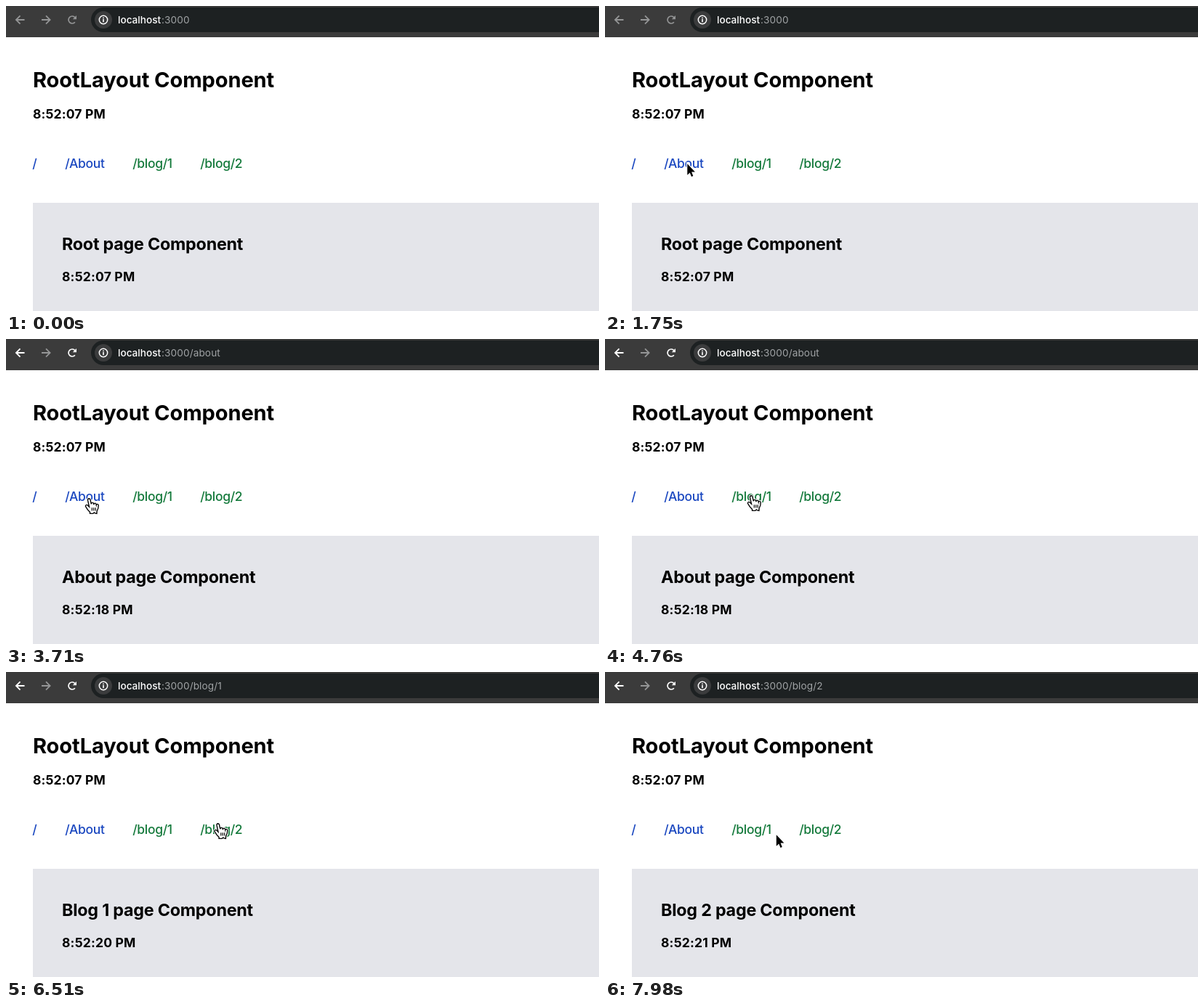
Animation of 816x420 px, one loop 8000 ms. Source, as an HTML page with a canvas:

```html
<!DOCTYPE html>
<html lang="en">
<head>
<meta charset="utf-8">
<title>Layout and page components</title>
<style>
html, body { margin: 0; width: 100%; height: 100%; overflow: hidden; background: #fff; }
canvas { display: block; }
</style>
</head>
<body>
<canvas id="stage" width="816" height="420"></canvas>
<script>
const ctx = document.getElementById('stage').getContext('2d');
const LOOP = 8000, STEP = 70;
const FOCUS_AT = 1960;

const pages = [
  { at: 0, path: '', title: 'Root page Component', time: '8:52:07 PM' },
  { at: 3570, path: '/about', title: 'About page Component', time: '8:52:18 PM' },
  { at: 5530, path: '/blog/1', title: 'Blog 1 page Component', time: '8:52:20 PM' },
  { at: 7280, path: '/blog/2', title: 'Blog 2 page Component', time: '8:52:21 PM' }
];

const BLUE = '#1b48c0', GREEN = '#157a3c';
const links = [
  { label: '/', x: 36.3, end: 42, color: BLUE },
  { label: '/About', x: 81.2, end: 135, color: BLUE },
  { label: '/blog/1', x: 174.2, end: 228, color: GREEN },
  { label: '/blog/2', x: 267.2, end: 324, color: GREEN }
];

// Pointer hotspot: time, x, y
const track = [
  [560, 178, 354], [770, 143, 272], [980, 123.5, 231], [1260, 115, 212],
  [1330, 115, 212], [1470, 112.5, 217], [1750, 112.5, 217], [2100, 112, 218],
  [4270, 112, 218], [4410, 132, 222], [4620, 183, 219], [4760, 199, 214],
  [5250, 198, 214], [6230, 198, 214], [6370, 248, 211], [6510, 289.5, 207],
  [6720, 290, 216], [6860, 290, 216], [6930, 291, 217], [7770, 291, 217],
  [7910, 264, 221], [7980, 235, 224]
];

const clicks = [[3360, 3500], [5320, 5460], [7070, 7210]];

const arrowShape = new Path2D('M0 0V15.6L3.4 12.4L5.7 17.7L8 16.7L5.8 11.4H10.6Z');
const handShape = new Path2D(
  'M2.9 14.8C2 13 .4 11.6 .2 10.4C0 8.8 1.8 8.2 3 9.2L5 11.2L3.2 3' +
  'C2.7 .2 5.6 -.4 6.4 2L7.7 7.6C7.6 5.4 10.6 5.2 10.9 7.3L11 8.4' +
  'C11.2 6 13.6 6.1 14 8L14.2 9C14.6 7.2 17 7.2 17 9.4' +
  'C17.2 12.4 16.8 14 15 17L14.8 20L12.6 19.6L11.4 18.6L10 20H6V18.2Z');
const handLines = new Path2D('M8.6 12.2V16.4M10.9 12.2V16.4M13.2 12.2V16.4');
const backIcon = new Path2D('M6 0H-5.4M0 -5.6L-5.6 0L0 5.6');
const reloadIcon = new Path2D('M3.9 3.2A5 5 0 1 1 3.9 -3.2L5 -2');
const reloadTip = new Path2D('M6 -6V-.8H.8Z');

function text(str, x, y, size, weight, color, spacing) {
  ctx.font = `${weight} ${size}px Inter, "Open Sans", sans-serif`;
  ctx.letterSpacing = spacing + 'px';
  ctx.fillStyle = color;
  ctx.fillText(str, x, y);
}

function disc(x, y, r, color) {
  ctx.fillStyle = color;
  ctx.beginPath();
  ctx.arc(x, y, r, 0, Math.PI * 2);
  ctx.fill();
}

function ring(x, y, r, width, color) {
  ctx.strokeStyle = color;
  ctx.lineWidth = width;
  ctx.beginPath();
  ctx.arc(x, y, r, 0, Math.PI * 2);
  ctx.stroke();
}

function at(x, y, draw) {
  ctx.save();
  ctx.translate(x, y);
  draw();
  ctx.restore();
}

function strokeShape(shape, color, width) {
  ctx.strokeStyle = color;
  ctx.lineWidth = width;
  ctx.stroke(shape);
}

function drawToolbar(active, path) {
  const dim = '#949596', lit = active ? '#fff' : dim;
  ctx.fillStyle = '#3b3b3b';
  ctx.fillRect(0, 0, 816, 43);
  ctx.fillStyle = '#1d2122';
  ctx.beginPath();
  ctx.roundRect(117, 2, 740, 34, 17);
  ctx.fill();

  at(19.5, 19, () => strokeShape(backIcon, lit, 1.8));
  at(55, 19, () => {
    ctx.scale(-1, 1);
    strokeShape(backIcon, dim, 1.8);
  });
  at(91, 19, () => {
    strokeShape(reloadIcon, lit, 1.7);
    ctx.fillStyle = lit;
    ctx.fill(reloadTip);
  });

  disc(134, 19, 12, '#3b3c3d');
  ring(134, 19, 5.7, 1.5, '#fff');
  ctx.fillStyle = '#fff';
  ctx.fillRect(133.2, 18, 1.6, 4.2);
  ctx.fillRect(133.2, 15.6, 1.6, 1.6);

  text('localhost', 154, 24, 13.6, 500, '#fff', 0);
  text(':3000' + path, 214, 24, 13.6, 400, '#a0a3a5', 0.12);
}

function drawPage(page) {
  text('RootLayout Component', 37, 112, 29, 700, '#000', -0.08);
  text('8:52:07 PM', 37, 155, 17.5, 700, '#000', 0.15);
  for (const link of links) text(link.label, link.x, 223, 17.5, 450, link.color, -0.33);
  ctx.fillStyle = '#e4e5ea';
  ctx.fillRect(37, 271, 779, 149);
  text(page.title, 77, 336, 23.3, 700, '#000', -0.22);
  text(page.time, 77, 379, 17.5, 700, '#000', 0.2);
}

function pointerAt(t) {
  const i = track.findIndex(key => key[0] > t);
  if (i < 0) return track[track.length - 1].slice(1);
  const [t0, x0, y0] = track[i - 1], [t1, x1, y1] = track[i];
  const k = (t - t0) / (t1 - t0);
  return [x0 + (x1 - x0) * k, y0 + (y1 - y0) * k];
}

function drawPointer(t) {
  if (t < track[0][0]) return;
  const [x, y] = pointerAt(t);
  const overLink = y > 203 && y < 231 && links.some(l => x >= l.x && x <= l.end);
  if (clicks.some(([on, off]) => t >= on && t < off)) ring(x, y, 37.1, 2.7, '#000');

  if (t >= FOCUS_AT && overLink) {
    at(x - 2.8, y + 1.2, () => {
      ctx.scale(1.06, 1.06);
      strokeShape(handShape, '#fff', 3);
      ctx.fillStyle = '#fff';
      ctx.fill(handShape);
      strokeShape(handShape, '#000', 1.3);
      strokeShape(handLines, '#000', 1.1);
    });
  } else {
    at(x + 0.8, y + 0.2, () => {
      strokeShape(arrowShape, '#fff', 2.4);
      ctx.fillStyle = '#000';
      ctx.fill(arrowShape);
    });
  }
}

function render(t) {
  const page = pages.filter(p => t >= p.at).pop();
  ctx.fillStyle = '#fff';
  ctx.fillRect(0, 0, 816, 420);
  drawPage(page);
  drawToolbar(t >= FOCUS_AT, page.path);
  drawPointer(t);
}

const start = performance.now();
function tick() {
  const t = (performance.now() - start) % LOOP;
  render(Math.floor(t / STEP) * STEP);
  requestAnimationFrame(tick);
}
tick();
</script>
</body>
</html>
```
